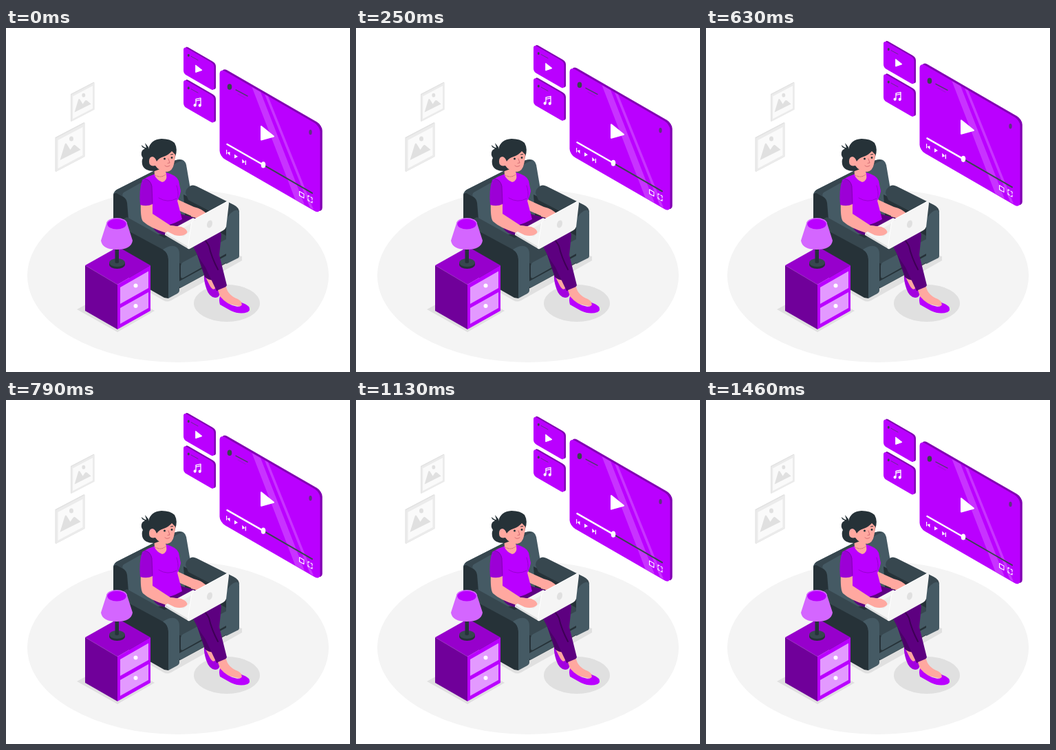
An HTML page for the animation above (1.5 s loop, 500x500 px).

```html
<!DOCTYPE html>
<html lang="en">
<head>
<meta charset="utf-8">
<title>Watching at home</title>
<style>
html, body { margin: 0; width: 100%; height: 100%; overflow: hidden; background: #fff; }
svg { display: block; width: 100vw; height: 100vh; }
.ink { fill: #263238; } .slate { fill: #37474f; } .steel { fill: #455a64; }
.vivid { fill: #ba00ff; } .deep { fill: #8200b3; } .pants { fill: #5d0080; }
.skin { fill: #ffa8a0; } .white { fill: #fff; } .pale { fill: #f5f5f5; }
.mist { fill: #ebebeb; } .gray { fill: #e0e0e0; } .glare { fill: #fff; opacity: .2; }
.line { fill: none; stroke: #263238; stroke-linecap: round; stroke-linejoin: round; }
.light { stroke: #fff; } .dim { stroke: #37474f; }
</style>
</head>
<body>
<svg viewBox="0 0 500 500">
  <defs>
    <g id="tile">
      <g transform="skewY(30)">
        <rect class="deep" x="2.5" y="-2.500" width="44.500" height="39.500" rx="4.5"/>
        <rect class="vivid" width="44.5" height="39.5" rx="4.5"/>
      </g>
      <ellipse class="slate" cx="7.3" cy="13" rx="1.5" ry="2"/>
      <path class="line dim" d="M11 14.5L21 20" stroke-width=".9" opacity=".7"/>
    </g>
    <g id="picture">
      <path class="gray" d="M0 22L42 0L43 1V50L1 72L0 71Z"/>
      <path class="mist" d="M1 23L43 1V50L1 72Z"/>
      <path fill="#fafafa" d="M4 26L40 7V48L4 67Z"/>
      <path class="gray" d="M7 55L14 32Q15.500 29 17 32L22 40L26 34Q28 32 30 34L37 40Z"/>
      <ellipse class="gray" cx="23.500" cy="24" rx="3" ry="3.600"/>
    </g>
  </defs>

  <!-- room -->
  <ellipse cx="250" cy="360" rx="219" ry="126" fill="#f4f4f4"/>
  <ellipse class="gray" cx="321" cy="400" rx="48" ry="27"/>
  <path class="gray" d="M103 409L162 442L216 411L160 378ZM180 368L229 396Q234 399 240 396L343 338V332L300 320Z"/>
  <use href="#picture" transform="translate(71.500 137)"/>
  <use href="#picture" transform="translate(94 78.500) scale(.8)"/>

  <!-- armchair -->
  <path class="ink" d="M170 270L262 240L320 282V342L253 378L236 384Z"/>
  <path class="steel" d="M156 243Q156 238 161 235L244 193Q259 187 262 199L269 240L268 300H165L156 290Z"/>
  <path class="ink" d="M156 243Q157 239 161 240L170 245Q175 248 176 254L179 290H156Z"/>
  <path class="slate" d="M161 235L244 193Q251 190 257 193Q251 194 248 196L171 239Q168 242 170 245L161 240Q156 238 161 235Z"/>
  <path class="ink" d="M258 242L325 275V318L262 300Z"/>
  <path class="slate" d="M261 240Q261 234 267 230Q271 227 277 230L331 257Q339 261 339 268L325 277L319 278L265 250Z"/>
  <path class="steel" d="M320 282Q322 271 331 266Q339 262 339 270V331Q339 334 336 335L320 343Z"/>
  <path class="slate" d="M230 305L290 285L320 302V308L257 342Q253 344 251 340L247 318Z"/>
  <path class="steel" d="M254 346Q254 342 258 340L320 307V328L258 363Q254 365 254 361Z"/>
  <path class="steel" d="M252 368L320 331V341L255 377Q252 378 252 374Z"/>
  <path class="slate" d="M156 291Q157 285 165 280L176 275L250 316Q251 325 247 331L232 335L160 296Z"/>
  <path class="ink" d="M156 290Q158 284 165 288L228 322Q236 327 236 337V393L230 392L160 352Q156 350 156 346Z"/>
  <path class="steel" d="M236 337Q236 327 228 322Q240 314 247 318Q252 321 252 328V382Q252 384 249 386L236 393Z"/>

  <!-- legs -->
  <path class="skin" d="M289 358L300 356L307 384L297 388Z"/>
  <path d="M288 358Q287 366 291 378Q295 391 304 392Q311 392 311 383L306 375Q302 385 296 374Z" fill="#a300df"/>
  <path d="M274 318L301 325L306 366Q296 368 289 362Z" fill="#4b0068"/>
  <path class="pants" d="M211 281L253 270L285 279Q311 288 313 301L310 330L321 374Q317 382 306 382L290 348Q276 328 270 313L231 301Q213 298 211 281Z"/>
  <path class="line" d="M284 303Q291 309 295 317Q299 334 308 351" style="stroke:#3d0054" stroke-width="2"/>
  <path class="skin" d="M308 381L320 376Q322 388 337 394Q347 400 341 405L320 400L312 393Z"/>
  <path class="vivid" d="M311 390Q309 395 311 402Q318 406 327 411Q340 417 351 413Q356 410 353 405Q349 401 342 399Q345 405 336 405Q322 403 311 390Z"/>

  <!-- torso, arms and head -->
  <path class="skin" d="M248 244L251 250L273 260Q286 263 291 270L279 277L269 273L246 263Z"/>
  <path class="vivid" d="M198 221Q207 215 217 212Q224 220 233 210Q248 214 251 222L254 237Q252 247 249 251L256 278Q235 290 213 289L211 258Z"/>
  <path class="line" d="M222 247Q235 255 248 248M248 229Q251 237 250 247" style="stroke:#8e00c4" stroke-width=".8"/>
  <path class="skin" d="M215 199L231 203L233 213Q235 222 227 224Q219 221 216 214Z"/>
  <path class="line" d="M217 214Q226 219 233 212" stroke-width=".7" stroke-dasharray=".8 1.700" style="stroke:#9b3e4d"/>
  <path class="skin" d="M196 252L213 255V270L239 287L255 289Q264 293 263 297Q258 304 246 302L233 298Q210 291 199 281Q195 276 196 252Z"/>
  <path d="M198 221Q207 216 212 228L213 256Q205 260 195 257Q193 235 198 221Z" fill="#9c00d6"/>
  <path class="line" d="M201 219Q210 220 212 230L213 255" style="stroke:#76009f" stroke-width=".7"/>
  <path class="ink" d="M207 176Q210 162 226 161Q239 161 245 167Q250 176 246 187L243 198L216 208Q200 208 198 198Q197 192 199 189Q195 184 198 178L202 175Q197 174 197 170Q201 174 204 174L202 167L207 173Z"/>
  <path class="skin" d="M219 194Q222 189 229 187Q237 184 241 179L246 184Q246 191 244 198Q242 208 234 209Q222 208 217 200Q208 202 208 194Q208 187 213 187Q217 188 219 194Z"/>
  <circle class="ink" cx="230.500" cy="190" r="1.500"/>
  <circle class="ink" cx="241" cy="188.500" r="1.400"/>
  <path class="line" d="M239.500 184L242.500 183.500" stroke-width="1"/>
  <path class="line" d="M236 190L238 196L235 196.500M231 200Q234 203 238 200" style="stroke:#c9606a" stroke-width=".8"/>

  <!-- laptop -->
  <path class="pale" d="M231 298L272 276L306 294L265 320Z"/>
  <path class="gray" d="M231 298L265 318V321L231 301Z"/>
  <path class="mist" d="M246 297L271 283L278 287L258 303Z"/>
  <path class="skin" d="M239 287L255 289Q265 293 263 298Q257 304 245 301L235 296ZM269 268Q282 262 292 270L280 277L269 274Z"/>
  <path class="pale" d="M272 279L321 252Q324 251 324 255L320 289Q319 292 316 294L267 321Q263 322 264 318L269 284Q270 281 272 279Z"/>
  <path class="line" d="M264.500 318L269.500 284Q270 281 272 279L321 252.500" style="stroke:#fff"/>
  <ellipse class="gray" cx="296" cy="285" rx="3.800" ry="5.700" transform="rotate(18 296 285)"/>

  <!-- cabinet and lamp -->
  <path d="M115 345L163 318L210 345L162 373Z" fill="#9700cc"/>
  <path d="M115 345L162 373V438L115 411Z" fill="#70009a"/>
  <path class="vivid" d="M162 373L210 345V411L162 438Z"/>
  <path d="M166 377L207 353.500V378L166 401ZM166 407L207 384V407L166 430Z" fill="#e399ff"/>
  <circle class="white" cx="188.500" cy="374.500" r="3"/>
  <circle class="white" cx="188.500" cy="404" r="3"/>
  <path class="ink" d="M150 341V344A11.500 6 0 0 0 173 344V341Z"/>
  <ellipse class="slate" cx="161.500" cy="341" rx="11.500" ry="6"/>
  <path class="ink" d="M158.500 315H164V341Q161 343 158.500 341Z"/>
  <path d="M146 284Q147 277 161 277Q175 277 176 284L184 309Q182 322 161 322Q140 322 138 309Z" fill="#d466ff"/>
  <ellipse cx="161" cy="284.500" rx="15" ry="8.500" fill="#d466ff"/>
  <ellipse class="vivid" cx="161" cy="285" rx="13.700" ry="7.500"/>

  <!-- floating screens -->
  <g id="screens">
    <use href="#tile" transform="translate(258 26.700)"/>
    <path class="white" d="M275.700 54V64.500L285 61.300Z" stroke="#fff" stroke-linejoin="round"/>
    <use href="#tile" transform="translate(258 74.200)"/>
    <path class="line light" d="M276 111.500V103.500L283 102V112.500M276 106L283 104.500" stroke-width="1.300"/>
    <ellipse class="white" cx="274.600" cy="112.300" rx="2" ry="2.200"/>
    <ellipse class="white" cx="281.700" cy="112.500" rx="2" ry="2.200"/>

    <g transform="translate(310.500 58.400) skewY(30)">
      <rect class="deep" x="3.300" y="-3.400" width="146" height="128" rx="8"/>
      <rect class="vivid" width="146" height="128" rx="8"/>
    </g>
    <path class="glare" d="M357.500 86L370 93L434 257L420.500 249.500ZM376 96.500L381 99.300L447 264L442 261.300Z"/>
    <ellipse class="slate" cx="325" cy="85.500" rx="3.300" ry="4.300"/>
    <path class="line dim" d="M334 90L351 99" stroke-width="1.400" opacity=".85"/>
    <path class="line dim" d="M337 96L348 102" stroke-width=".7" opacity=".3"/>
    <ellipse class="slate" cx="442.500" cy="151.500" rx="2.200" ry="3.700" opacity=".7"/>
    <path class="white" d="M371 143V162.500L389 157.500Z" stroke="#fff" stroke-width="2" stroke-linejoin="round"/>
    <path class="line dim" d="M374 199L445 240" stroke-width="2"/>
    <path class="line light" d="M321.500 169L374 199" stroke-width="2.500"/>
    <ellipse class="white" cx="374" cy="199" rx="3.300" ry="4.600"/>
    <path class="white" d="M320 177H321.200V183.500H320ZM325.500 180V185.500L321.500 181ZM332 183.500V189.500L337 187ZM343.300 190.500V196.500L347.500 195ZM347.700 192.500H349V199H347.700Z"/>
    <path class="line light" d="M426.500 237.500L433 241.300V247.300L426.500 243.500Z" stroke-width="1.100"/>
    <path class="line light" d="M439 246V243.500L441 244.600M443 245.800L445 247V249.500M445 251.500V254L443 252.900M441 251.700L439 250.500V248" stroke-width="1.100"/>
  </g>
</svg>
<script>
const screens = document.getElementById("screens");
const LOOP = 1500, LEAD = 28, RISE = 9;

function draw(now) {
  const phase = (now + LEAD) / LOOP * 2 * Math.PI;
  const lift = RISE * (1 - Math.cos(phase)) / 2;
  screens.setAttribute("transform", `translate(0 ${-lift})`);
  requestAnimationFrame(draw);
}
draw(0);
</script>
</body>
</html>
```
